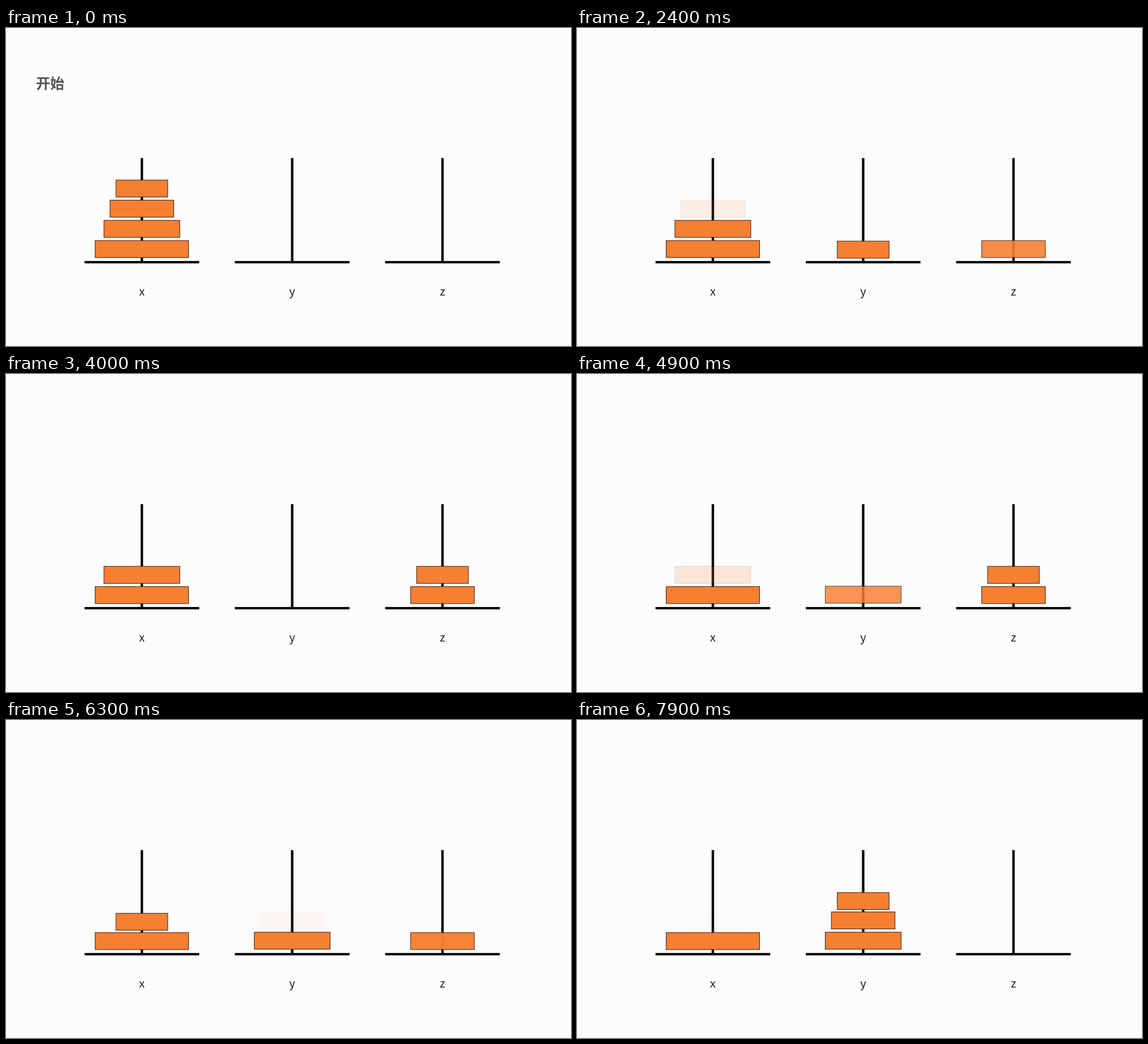
Write an HTML page that moves like this. It is 998 by 561 pixels and loops after 8000 ms.

```html
<!DOCTYPE html>
<html lang="zh-CN">
<head>
<meta charset="utf-8">
<style>
  html, body { margin: 0; width: 100%; height: 100%; overflow: hidden; background: #fcfcfc; }
  svg { display: block; width: 998px; height: 561px; }
  text { font-family: "Noto Sans CJK SC", "Noto Sans CJK", "Noto Sans", sans-serif; }
  .label { font-size: 20px; text-anchor: middle; fill: #222; }
  .title { font-size: 25px; font-weight: 700; fill: #555; }
  .peg { stroke: #080808; stroke-width: 4.4; fill: none; }
  .disc { fill: #f77f32; stroke: #26201c; stroke-width: 1; }
</style>
</head>
<body>
<svg viewBox="0 0 998 561">
  <rect x="35" y="19" width="2" height="1" fill="#e4e4e4"/>
  <text class="title" x="53" y="107">开始</text>
</svg>
<script>
const LOOP = 8000, FRAME = 100, FADE = 600, TITLE_END = 700;
const pegX = { x: 240, y: 505.5, z: 771 };
const widths = [91.5, 112.5, 134, 165];

// Each stay of a disc: [disc, peg, top, fade-in start, fade-out start]
const stays = [
  [3, 'x', 375, -LOOP, LOOP],
  [2, 'x', 339.3, -LOOP, 4460],
  [2, 'y', 374.3, 4460, LOOP],
  [1, 'x', 303.8, -LOOP, 1920],
  [1, 'z', 375, 1920, 6230],
  [1, 'y', 338.6, 6230, LOOP],
  [0, 'x', 268.2, -LOOP, 900],
  [0, 'y', 376, 900, 3030],
  [0, 'z', 339.3, 3030, 5350],
  [0, 'x', 341, 5350, 7320],
  [0, 'y', 304.4, 7320, LOOP]
];

const svg = document.querySelector('svg');
const title = document.querySelector('.title');

function add(tag, attrs) {
  const el = document.createElementNS(svg.namespaceURI, tag);
  for (const key in attrs) el.setAttribute(key, attrs[key]);
  return svg.appendChild(el);
}

for (const name in pegX) {
  const cx = pegX[name];
  add('path', { class: 'peg', d: `M${cx} 229.5V413M${cx - 101.3} 413.1h202.6` });
  add('text', { class: 'label', x: cx, y: 472 }).textContent = name;
}

const discs = stays.map(([size, peg, top]) => add('rect', {
  class: 'disc', x: pegX[peg] - widths[size] / 2, y: top, width: widths[size], height: 30
}));

function ease(t) {
  const u = Math.min(1, Math.max(0, t / FADE));
  return u * u * (3 - 2 * u);
}

function draw(now) {
  const t = Math.floor(now % LOOP / FRAME) * FRAME;
  title.style.opacity = t < TITLE_END ? 1 : 0;
  stays.forEach(([, , , from, to], i) => {
    discs[i].style.opacity = ease(t - from) * (1 - ease(t - to));
  });
  requestAnimationFrame(draw);
}
requestAnimationFrame(draw);
</script>
</body>
</html>
```
